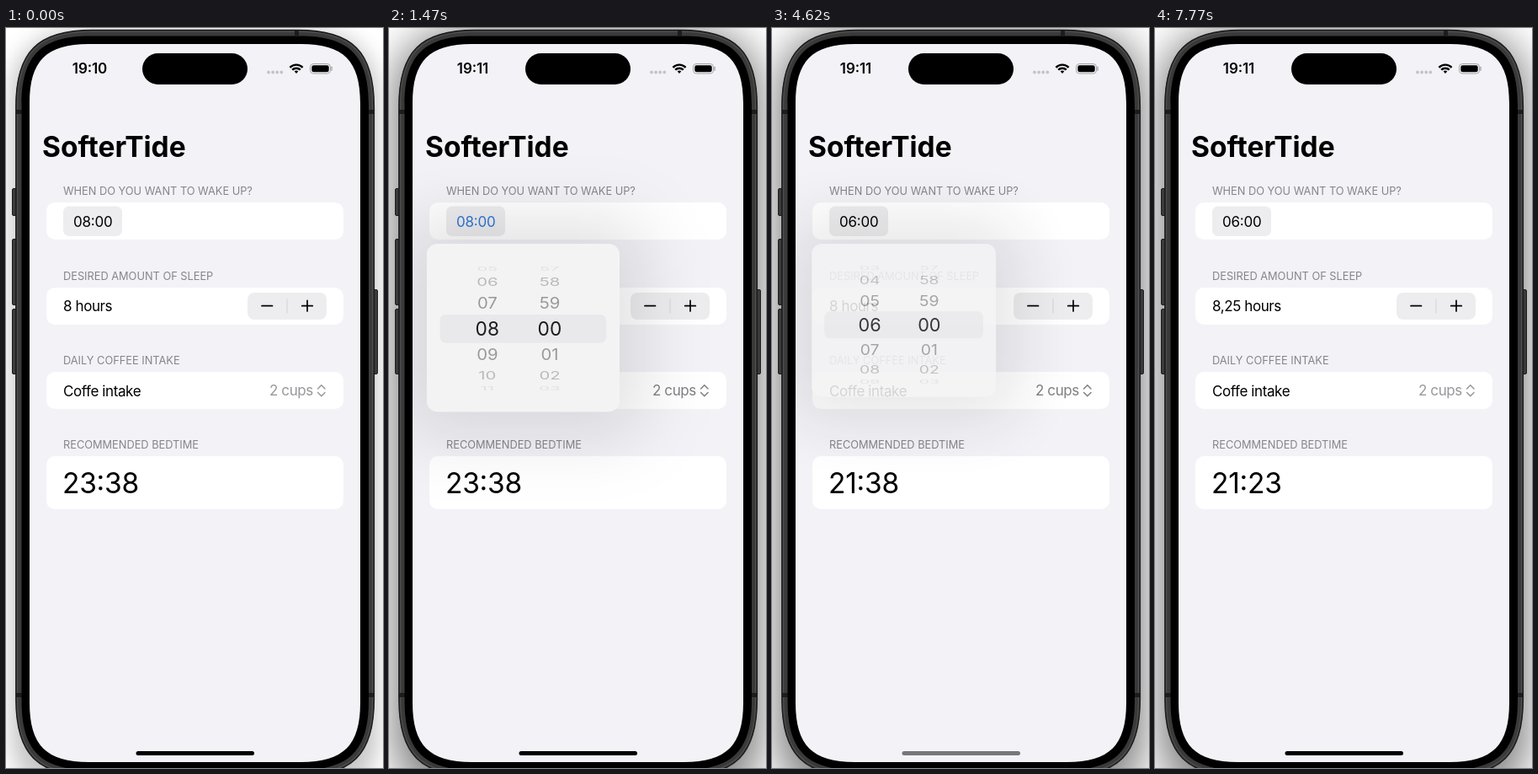
Recreate the animation shown at these times as an HTML page. Size 448 by 878 pixels, loop 8000 ms.

```html
<!DOCTYPE html>
<html lang="en">
<head>
<meta charset="utf-8">
<title>Bedtime calculator</title>
<style>
  html, body { margin: 0; width: 100%; height: 100%; overflow: hidden; background: #fff; }
  svg { display: block; width: 100%; height: 100%; }
  text { font: 17px Inter, "Liberation Sans", sans-serif; letter-spacing: -.4px; white-space: pre; }
  .title { font-size: 33.5px; font-weight: 700; letter-spacing: 0; }
  .clock { font-weight: 600; letter-spacing: -.1px; text-anchor: middle; }
  .head { font-size: 12.8px; letter-spacing: -.01px; fill: #85858a; }
  .time { letter-spacing: -.2px; }
  .bed text { font-size: 33.5px; letter-spacing: -.25px; }
  .clock, .time, .bed text { font-feature-settings: "calt", "case"; }
  .wheel text { text-anchor: middle; letter-spacing: 0; }
  .line { fill: none; stroke: #000; stroke-width: 1.7; stroke-linecap: round; stroke-linejoin: round; }
</style>
</head>
<body>
<svg viewBox="0 0 448 878">
  <defs>
    <filter id="soft" filterUnits="userSpaceOnUse" x="-100" y="-100" width="650" height="1150">
      <feGaussianBlur id="softBlur" stdDeviation="13"/>
    </filter>
    <filter id="wide" filterUnits="userSpaceOnUse" x="-150" y="50" width="700" height="700">
      <feGaussianBlur stdDeviation="40"/>
    </filter>
    <clipPath id="screen"><path id="screenShape"/></clipPath>
    <clipPath id="panelClip"><rect id="clipBox" x="44" y="256" width="232" rx="13"/></clipPath>
  </defs>

  <!-- phone body -->
  <rect id="phoneShadow" x="6" y="4" width="436" height="910" rx="72" filter="url(#soft)"/>
  <g fill="#3c3c3d" stroke="#1c1c1d">
    <rect x="7.5" y="190.5" width="8" height="32" rx="1.5"/>
    <rect x="7.5" y="250.5" width="8" height="78" rx="1.5"/>
    <rect x="7.5" y="333.5" width="8" height="77" rx="1.5"/>
    <rect x="433" y="310.5" width="8.5" height="100" rx="1.5"/>
  </g>
  <path id="frame" fill="#3a3a3b" stroke="#1b1b1c" stroke-width="1.4"/>
  <path id="frameEdge" fill="none" stroke="#4e4e4f" stroke-width="1.2"/>
  <path d="M12 99.500H19M430 99.500H437M12 791.500H19M430 791.500H437M345.500 3V9" stroke="#1c1c1d" stroke-width="5"/>
  <path id="bezel"/>

  <g clip-path="url(#screen)">
    <rect x="28" y="19" width="393" height="852" fill="#f2f2f7"/>

    <!-- status bar -->
    <text id="clock" class="clock" x="99.500" y="54"></text>
    <rect x="162" y="30" width="125" height="37" rx="18.500"/>
    <path d="M312 52.500h15.500" stroke="#c3c3c8" stroke-width="3.8" stroke-linecap="round" stroke-dasharray="0 5.100"/>
    <g fill="none" stroke="#000" stroke-width="2.400">
      <path d="M337.400 46.800a10.700 10.700 0 0 1 15.200 0M340.200 49.700a6.800 6.800 0 0 1 9.600 0"/>
      <path d="M345 54l-2.300-2.400a3.300 3.300 0 0 1 4.600 0z" fill="#000" stroke="none"/>
    </g>
    <rect x="361.500" y="42.500" width="24" height="11.500" rx="3.700" fill="none" stroke="#a4a4a8"/>
    <rect x="363.300" y="44.200" width="20.400" height="8.100" rx="2.300"/>
    <path d="M387 46.300v4" stroke="#a4a4a8" stroke-width="1.300" stroke-linecap="round"/>

    <!-- form -->
    <text class="title" x="43" y="153">SofterTide</text>
    <text class="head" x="68" y="198">WHEN DO YOU WANT TO WAKE UP?</text>
    <text class="head" x="68" y="298.500">DESIRED AMOUNT OF SLEEP</text>
    <text class="head" x="68" y="398.700">DAILY COFFEE INTAKE</text>
    <text class="head" x="68" y="499">RECOMMENDED BEDTIME</text>
    <g fill="#fff">
      <rect x="48" y="207" width="353" height="44" rx="10"/>
      <rect x="48" y="308" width="353" height="44" rx="10"/>
      <rect x="48" y="408" width="353" height="44" rx="10"/>
      <rect x="48" y="508" width="353" height="63" rx="10"/>
    </g>
    <rect x="68" y="211.500" width="70" height="35.500" rx="7" fill="#ededef"/>
    <g id="wake"></g>
    <text id="hours" x="68" y="336"></text>
    <rect x="287" y="314" width="94" height="32" rx="8" fill="#ededef"/>
    <rect id="plusPress" x="334" y="314" width="47" height="32" rx="8" fill="#d9d9dc"/>
    <path d="M334 321.500v17" stroke="#d3d3d7"/>
    <path class="line" d="M304 329.700h12.500M351.700 329.700h12.600M358 323.400v12.600"/>
    <text x="68" y="436.500">Coffe intake</text>
    <g id="cups">
      <text x="313" y="436.300">2 cups</text>
      <path d="M370.600 428l4.200-4.200 4.200 4.200M370.600 432.500l4.200 4.200 4.200-4.200" fill="none" stroke="currentColor" stroke-width="1.500" stroke-linecap="round" stroke-linejoin="round"/>
    </g>
    <g id="bed" class="bed"></g>

    <!-- time picker -->
    <g id="popover">
      <g filter="url(#wide)"><rect id="popShadow" x="14" y="226" width="292" rx="30" opacity=".115"/></g>
      <g id="panel">
        <g clip-path="url(#panelClip)">
          <rect x="44" y="256" width="232" height="204" fill="#f3f3f4"/>
          <rect x="60" y="341" width="200" height="34" rx="7" fill="#e9e9eb"/>
          <g id="wheel" class="wheel"></g>
        </g>
      </g>
    </g>
    <rect id="home" x="154.500" y="858" width="140.500" height="5" rx="2.500"/>
  </g>
</svg>

<script>
const LOOP = 8000, STEP = 70;
const $ = id => document.getElementById(id);
const set = (id, attrs) => { for (const k in attrs) $(id).setAttribute(k, attrs[k]); };
const clamp = v => Math.min(1, Math.max(0, v));
const smooth = u => u * u * (3 - 2 * u);
const pad = n => String(n).padStart(2, '0');

// Rectangle with continuous corners: the curve starts early and eases in.
function squircle(x, y, w, h, r) {
  const a = 1.28 * r, c = .36 * r, b = a - c;
  return `M${x + a} ${y}h${w - 2 * a}c${b} 0 ${a} ${c} ${a} ${a}v${h - 2 * a}` +
    `c0 ${b} ${-c} ${a} ${-a} ${a}h${2 * a - w}c${-b} 0 ${-a} ${-c} ${-a} ${-a}` +
    `v${2 * a - h}c0 ${-b} ${c} ${-a} ${a} ${-a}z`;
}

// Fade from one label to another in three steps beginning at `start`.
const fade = (t, start) => clamp((t - start + STEP) / (3 * STEP));
const label = (x, y, text, opacity, attrs = '') =>
  opacity > 0 ? `<text x="${x}" y="${y}" opacity="${opacity}" ${attrs}>${text}</text>` : '';
const blend = (x, y, from, to, k, attrs) => label(x, y, from, 1 - k, attrs) + label(x, y, to, k, attrs);

// One drum column: rows lie on a cylinder seen from the front.
function drum(x, value, count) {
  let rows = '';
  const middle = Math.round(value);
  for (let n = middle - 4; n <= middle + 4; n++) {
    const angle = (n - value) * .425, squash = Math.cos(angle);
    if (squash < .08) continue;
    const chosen = n === middle, size = chosen ? 23 : 20.5;
    const y = 358 + 75 * Math.sin(angle);
    rows += `<text transform="translate(${x} ${y}) scale(1 ${squash})" y="${size * .364}"
      style="font-size:${size}px" opacity="${chosen ? .88 : .42 * squash ** 1.4}">${pad((n + count) % count)}</text>`;
  }
  return rows;
}

function popoverState(t) {
  if (t < 1050 || t >= 4760) return { scale: 1, opacity: 0 };
  if (t < 4620) return {
    scale: t < 1540 ? 1 - .6 * Math.exp(-(t - 1050) * .00944) : 1,
    opacity: clamp((t - 980) / 290)
  };
  const p = (t - 4550) / 210;
  return { scale: 1 - .168 * p, opacity: 1 - p ** 1.9 };
}

function render(now) {
  const t = Math.floor(now % LOOP / STEP) * STEP;
  const active = t >= 910, picking = t >= 980 && t < 4620;
  const { scale, opacity } = popoverState(t);

  set('phoneShadow', { opacity: active ? .52 : .22 });
  set('softBlur', { stdDeviation: active ? 25 : 13 });
  $('clock').textContent = active ? '19:11' : '19:10';

  const wakeStyle = `class="time" fill="${picking ? '#2d76d6' : '#000'}"`;
  const changed = fade(t, 3990), later = fade(t, 7630);
  $('wake').innerHTML = blend(80, 236, '08:00', '06:00', changed, wakeStyle);
  $('bed').innerHTML = later > 0
    ? blend(67, 552, '21:38', '21:23', later)
    : blend(67, 552, '23:38', '21:38', changed);
  $('hours').textContent = t >= 7630 ? '8,25 hours' : '8 hours';
  set('plusPress', { opacity: t >= 7630 && t < 7770 ? 1 : 0 });

  const grey = opacity > 0 ? '#808084' : '#98989c';
  set('cups', { fill: grey, color: grey });

  set('popover', { opacity });
  if (opacity > 0) {
    const height = 204 * scale;
    const transform = `translate(100 256) scale(${scale}) translate(-100 -256)`;
    set('panel', { transform });
    set('popShadow', { transform, height: height + 60 });
    set('clipBox', { height });
    const hour = 8 - 2 * smooth(clamp((t - 2940) / 770));
    $('wheel').innerHTML = drum(117, hour, 24) + drum(192, 0, 60);
  }
  set('home', { fill: t >= 4620 && t < 5180 ? '#77777a' : '#000' });
}

set('screenShape', { d: squircle(28, 19, 393, 852, 55) });
set('bezel', { d: squircle(18.5, 9.5, 412.5, 871, 64) });
set('frameEdge', { d: squircle(13.6, 4.4, 422, 881, 69) });
set('frame', { d: squircle(11.8, 2.5, 425.6, 885, 71) });

const start = performance.now();
function tick() {
  render(performance.now() - start);
  requestAnimationFrame(tick);
}
tick();
</script>
</body>
</html>
```
